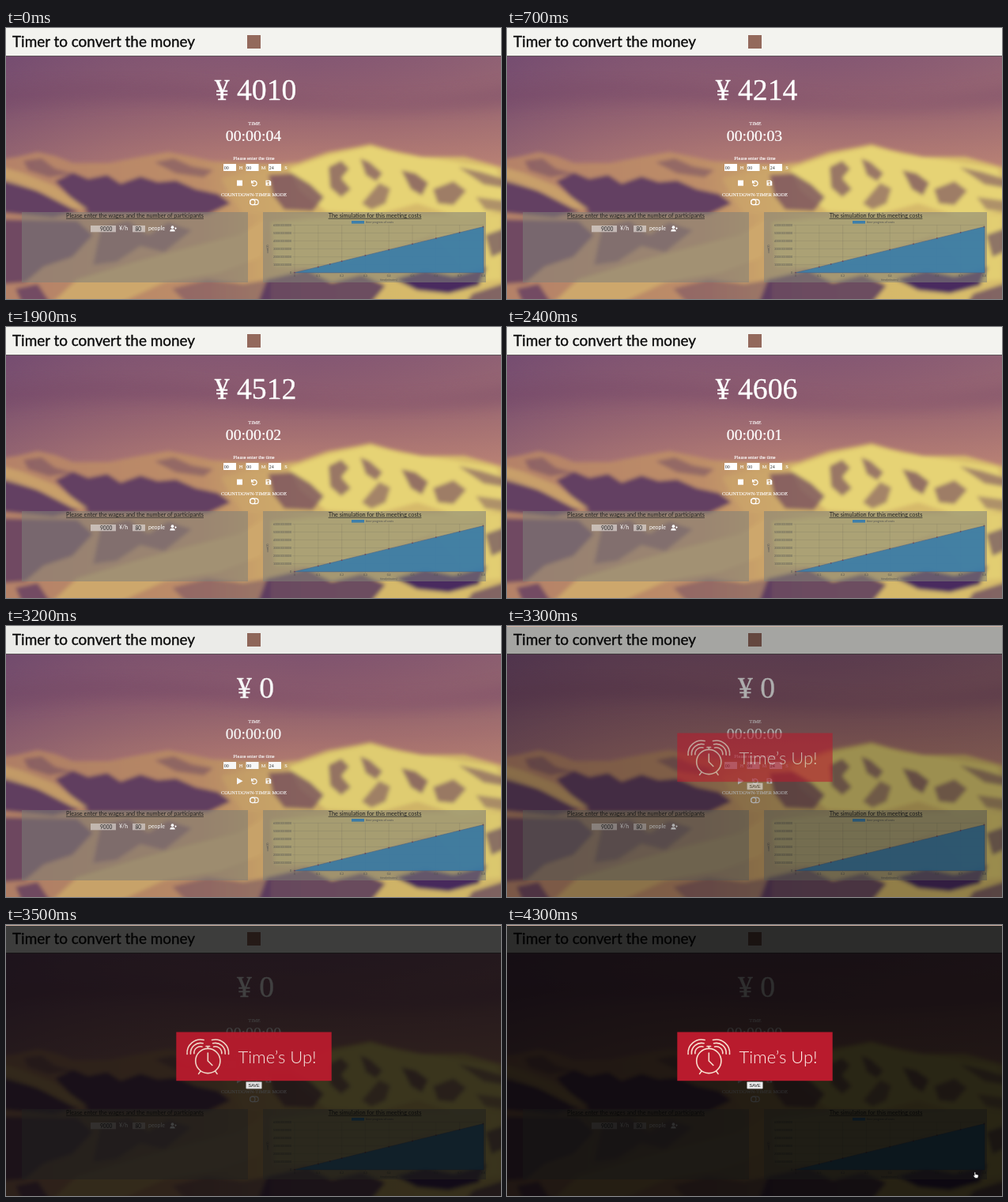
An HTML page that plays this animation: 626x343 px, repeating every 4.4 s.

```html
<!DOCTYPE html>
<html lang="en">
<head>
<meta charset="utf-8">
<title>Timer to convert the money</title>
<style>
  html, body { margin: 0; width: 100%; height: 100%; overflow: hidden; background: #000; }
  svg { display: block; width: 100vw; height: 100vh; }
  .serif { font-family: "Liberation Serif", serif; fill: #fff; text-anchor: middle; }
  .sans { font-family: Lato, sans-serif; }
  .small { font-size: 6.3px; stroke: #fff; stroke-width: .12; }
  .heading { font-size: 7.3px; fill: #222; text-anchor: middle; text-decoration: underline; }
  .tiny { font: 3.6px Lato, sans-serif; fill: #555; }
  .line { fill: none; stroke-linecap: round; stroke-linejoin: round; }
</style>
</head>
<body>
<svg viewBox="0 0 626 343" preserveAspectRatio="none">
  <defs>
    <linearGradient id="sky" x2="0" y2="1">
      <stop offset="0" stop-color="#7c5275"/>
      <stop offset=".45" stop-color="#8e5d70"/>
      <stop offset="1" stop-color="#bd8474"/>
    </linearGradient>
    <linearGradient id="dusk">
      <stop offset="0" stop-color="#5b3b6d" stop-opacity=".35"/>
      <stop offset=".6" stop-color="#a06a70" stop-opacity="0"/>
      <stop offset="1" stop-color="#c08a78" stop-opacity=".2"/>
    </linearGradient>
    <linearGradient id="snow">
      <stop offset="0" stop-color="#b48168"/>
      <stop offset=".4" stop-color="#bd8d68"/>
      <stop offset=".6" stop-color="#d3b46a"/>
      <stop offset="1" stop-color="#d9bf6c"/>
    </linearGradient>
    <filter id="soft" x="-10%" y="-10%" width="120%" height="120%"><feGaussianBlur stdDeviation="2.8"/></filter>
    <filter id="hazy" x="-10%" y="-30%" width="120%" height="160%"><feGaussianBlur stdDeviation="9"/></filter>
    <clipPath id="stage"><rect width="626" height="343"/></clipPath>
  </defs>

  <!-- blurred mountain landscape -->
  <g clip-path="url(#stage)">
    <rect width="626" height="190" fill="url(#sky)"/>
    <rect width="626" height="190" fill="url(#dusk)"/>
    <path d="M-20 75Q150 55 320 82T650 70V98Q450 112 300 98T-20 104Z" fill="#744766" opacity=".35" filter="url(#hazy)"/>
    <g filter="url(#soft)">
      <path d="M-20 168L15 163L40 157L62 162L85 171L130 171L165 164L205 157L235 163L262 169L300 171L340 173L370 170L407 157L440 151L461 147L485 154L526 163L580 163L626 176L650 180V370H-20Z" fill="url(#snow)"/>
      <!-- shaded slopes on the left -->
      <g fill="#633f62">
        <path d="M-20 186L12 194L48 210L92 232L60 240L-20 232Z"/>
        <path d="M62 194L85 183L104 191L128 186L145 197L170 188L192 195L215 193L240 204L268 210L284 222L255 236L105 236L82 215Z"/>
        <path d="M22 168L45 165L62 178L85 184L55 189L28 180Z" opacity=".45"/>
        <path d="M188 170L212 165L235 175L262 180L250 189L215 184Z" opacity=".45"/>
        <path d="M-20 242L90 244L110 262L84 290L48 302L24 322L-20 325Z" opacity=".85"/>
        <path d="M120 252L155 244L180 262L205 246L235 256L200 284L170 276L140 296L110 300Z" opacity=".6"/>
        <path d="M12 330L40 324L56 348H20Z" opacity=".8"/>
        <path d="M210 330L255 318L300 324L335 318V350H230Z" opacity=".45"/>
      </g>
      <g fill="#cda76c">
        <path d="M-20 172L20 183L60 199L104 230L84 229L40 206L-20 189Z" opacity=".8"/>
        <path d="M90 318L160 297L230 278L295 262L330 240L322 290L270 310L200 322L140 350H56Z"/>
        <path d="M272 190L310 182L350 188L330 208L345 232L300 236L285 214Z" opacity=".6"/>
      </g>
      <!-- sunlit peak on the right -->
      <g fill="#e6d375">
        <path d="M358 178L408 161L461 150L500 160L560 168L620 178L640 230L575 240L520 222L470 236L405 232L372 206Z"/>
        <path d="M335 246L420 238L626 236V318L590 322L540 262L430 300L340 302Z" opacity=".75"/>
      </g>
      <g fill="#79505f">
        <path d="M332 186L362 184L385 198L402 214L388 232L352 230L338 212Z" opacity=".8"/>
        <path d="M408 176L424 168L434 178L424 190L436 204L424 214L410 202Z" opacity=".7"/>
        <path d="M448 165L460 170L476 184L468 194L455 186Z" opacity=".7"/>
        <path d="M472 196L486 203L480 222L462 230L450 222Z" opacity=".6"/>
        <path d="M500 180L518 184L534 196L526 212L512 204Z" opacity=".75"/>
        <path d="M540 204L566 194L582 206L566 224L546 222Z" opacity=".65"/>
        <path d="M572 176L600 182L640 194V204L604 198Z" opacity=".6"/>
        <path d="M594 214L640 220V234L606 230Z" opacity=".5"/>
      </g>
      <!-- dark rocks along the bottom -->
      <g fill="#4a2a5e">
        <path d="M330 318L380 306L412 322L450 312L480 326L460 350H318Z" opacity=".75"/>
        <path d="M492 318L530 306L566 314L608 302L598 326L560 336L520 332Z"/>
        <path d="M590 336L640 320V350H580Z" opacity=".6"/>
        <path d="M606 262L640 250V278L614 290Z" opacity=".55"/>
      </g>
    </g>
  </g>

  <!-- header -->
  <rect width="626" height="36" fill="#f3f3ef"/>
  <rect y="35" width="626" height="1" fill="#5d5358"/>
  <text class="sans" x="8" y="24" font-size="18.9" fill="#0c0c0c" stroke="#0c0c0c" stroke-width=".35">Timer to convert the money</text>
  <rect x="305" y="9" width="17" height="17" fill="#93695c"/>

  <!-- timer -->
  <text class="serif" id="amount" x="315.5" y="90.6" font-size="37.7" stroke="#fff" stroke-width=".3"></text>
  <text class="serif small" x="314" y="123.3">TIME</text>
  <text class="serif" id="clock" x="313" y="143" font-size="19.8" stroke="#fff" stroke-width=".2"></text>
  <text class="serif small" x="313.5" y="166.6">Please enter the time</text>
  <g id="fields"></g>
  <path id="stop" d="M292 192.7h7v7h-7z" fill="#fff"/>
  <path id="play" d="M292 192l7.5 4.2l-7.5 4.2z" fill="#fff"/>
  <path class="line" d="M310.6 193.5v2.6h2.6M310.8 196A3.2 3.2 0 1 1 311.5 198.8" stroke="#fff" stroke-width="1.3"/>
  <path d="M328.5 192.8h5l1.8 1.8v5h-6.8zM329.6 193.8v1.8h3.4v-1.8zM330.6 197.6a1.2 1.2 0 1 0 2.4 0a1.2 1.2 0 1 0-2.4 0" fill="#fff" fill-rule="evenodd"/>
  <text class="serif small" x="313.5" y="213.2">COUNTDOWN-TIMER MODE</text>
  <g class="line" stroke="#fff" stroke-width="1.2">
    <rect x="308.6" y="217.2" width="10.6" height="6.4" rx="3.2"/>
    <circle cx="311.8" cy="220.4" r="3.2"/>
  </g>

  <!-- wages panel -->
  <g fill="#808078" fill-opacity=".55">
    <rect x="20" y="233" width="286" height="89"/>
    <rect x="325" y="233" width="282" height="89"/>
  </g>
  <text class="sans heading" x="163" y="239.8">Please enter the wages and the number of participants</text>
  <g fill="#d9d0cd" fill-opacity=".75">
    <rect x="107" y="250" width="32" height="8.3"/>
    <rect x="160" y="250" width="16" height="8.3"/>
  </g>
  <g class="sans" font-size="7">
    <text x="119" y="256.6" font-size="6.6" fill="#222">9000</text>
    <text x="163.5" y="256.6" font-size="6.6" fill="#222">80</text>
    <text x="143" y="256.4" fill="#fff">¥/h</text>
    <text x="180" y="256.4" fill="#fff">people</text>
  </g>
  <g fill="#fff">
    <circle cx="210.5" cy="252.2" r="1.9"/>
    <path d="M207.3 257.5q0-3 3.2-3t3.2 3zM213.2 253.2h2.6v.9h-2.6zM214 252.3h.9v2.7h-.9z"/>
  </g>

  <!-- cost chart -->
  <text class="sans heading" x="466.5" y="239.8">The simulation for this meeting costs</text>
  <rect x="437" y="244" width="16" height="3.6" fill="#3d7fab"/>
  <text class="tiny" x="455" y="247.3">time-progress of costs</text>
  <g id="grid"></g>
  <path d="M365 309.7L604 251.5V309.7Z" fill="#3b7da8" fill-opacity=".92" stroke="#4a6486" stroke-width=".6"/>
  <g id="dots" fill="#6d4a5c"></g>
  <text class="tiny" transform="translate(332 285) rotate(-90)">cost(¥)</text>
  <text class="tiny" x="484" y="319.8" text-anchor="middle">time(minutes)</text>

  <!-- alert -->
  <rect id="shade" width="626" height="343"/>
  <rect id="edge" width="626" height="1" fill="#d5b5a7"/>
  <g id="alert">
    <rect x="215.3" y="135.5" width="196.4" height="61.7" fill="#b91b2d"/>
    <g class="line" stroke="#f8dfcf" stroke-width="1.6">
      <circle cx="255.3" cy="172" r="15.6"/>
      <path d="M255.3 162v10l5.5 5.5M246 185l-2.4 3.4M264.6 185l2.4 3.4M255.3 156v-2.2M253 153.5h4.6"/>
      <path id="bell"/>
      <use href="#bell" transform="matrix(-1 0 0 1 510.6 0)"/>
    </g>
    <text class="sans" x="293.5" y="175" font-size="22" font-weight="300" fill="#fff1ea">Time’s Up!</text>
    <rect x="303.5" y="198.4" width="20" height="8.8" rx=".8" fill="#eee" stroke="#888" stroke-width=".5"/>
    <text x="313.5" y="204.8" font-family="Liberation Sans, sans-serif" font-size="5.4" text-anchor="middle" fill="#111">SAVE</text>
  </g>
  <path id="pointer" d="M591 313q1-.8 1.5 .3v2.2l3 .7q.8.4.6 1.6l-.8 2.5h-3.3l-2.2-2.8q.3-1 1.4-.2z" fill="#fff" stroke="#222" stroke-width=".5"/>
</svg>

<script>
const LOOP = 4400, STEP = 100, RESET = 3200;
const GOAL = 4800, YEN_PER_SECOND = 200;
const $ = id => document.getElementById(id);
const range = n => [...Array(n).keys()];

// Piecewise linear value through [time, value] points
function track(points, t) {
  const i = points.findIndex(p => p[0] > t);
  if (i < 0) return points[points.length - 1][1];
  if (i === 0) return points[0][1];
  const [t0, v0] = points[i - 1], [t1, v1] = points[i];
  return v0 + (v1 - v0) * (t - t0) / (t1 - t0);
}

const MONEY = [[0, 4010], [1400, 4419], [2400, 4606], [3200, 4800]];
const SHADE = [[3100, 0], [3200, .03], [3300, .32], [3400, .57], [3500, .75], [3600, .82]];
const ALERT = [[3200, 0], [3300, .58], [3400, .8], [3500, .95], [3600, 1]];

$('fields').innerHTML = [['00', 'H'], ['00', 'M'], ['24', 'S']].map(([value, unit], i) => {
  const x = 275 + i * 28.5;
  return `<rect x="${x}" y="172" width="16" height="9" fill="#fff"/>
    <text x="${x + .8}" y="178.6" font-family="Liberation Serif, serif" font-size="6" fill="#333">${value}</text>
    <text class="serif small" x="${x + 22}" y="178.8">${unit}</text>`;
}).join('');

const rows = range(7).map(i => {
  const y = 309.7 - i * 10.05;
  return `<path d="M362 ${y}H604" stroke="#555" stroke-opacity=".25" stroke-width=".5"/>
    <text class="tiny" x="361" y="${y + 1.2}" text-anchor="end">${i ? i + '0000000000' : 0}</text>`;
});
const columns = range(9).map(i => {
  const x = 365 + i * 29.8;
  return `<path d="M${x} 249.4V312" stroke="#555" stroke-opacity=".25" stroke-width=".5"/>
    <text class="tiny" x="${x}" y="315.3" text-anchor="middle">${i ? (i / 10).toFixed(1) : 0}</text>`;
});
$('grid').innerHTML = rows.concat(columns).join('');
$('dots').innerHTML = [0, 1, 1.5, 2, 3, 4, 5, 6, 7, 8].map(i =>
  `<circle cx="${365 + i * 29.8}" cy="${309.7 - i * 7.27}" r=".9"/>`).join('');

$('bell').setAttribute('d', [17, 12.6, 8.2].map(r => {
  const at = deg => {
    const a = deg * Math.PI / 180;
    return `${246 + r * Math.cos(a)} ${162 + r * Math.sin(a)}`;
  };
  return `M${at(175)}A${r} ${r} 0 0 1 ${at(284)}`;
}).join(''));

const show = (id, visible) => $(id).style.display = visible ? '' : 'none';

function draw(t) {
  const running = t < RESET;
  const earned = Math.floor(track(MONEY, t) + 1e-6);
  const left = running ? Math.ceil((GOAL - earned) / YEN_PER_SECOND) : 0;
  $('amount').textContent = '¥ ' + (running ? earned : 0);
  $('clock').textContent = '00:00:' + String(left).padStart(2, '0');
  show('stop', running);
  show('play', !running);
  $('shade').setAttribute('opacity', track(SHADE, t));
  $('alert').setAttribute('opacity', track(ALERT, t));
  show('edge', t > RESET);
  show('pointer', t >= 4300);
}

const start = performance.now();
function tick() {
  const t = (performance.now() - start) % LOOP;
  draw(Math.floor(t / STEP) * STEP);
  requestAnimationFrame(tick);
}
tick();
</script>
</body>
</html>
```
